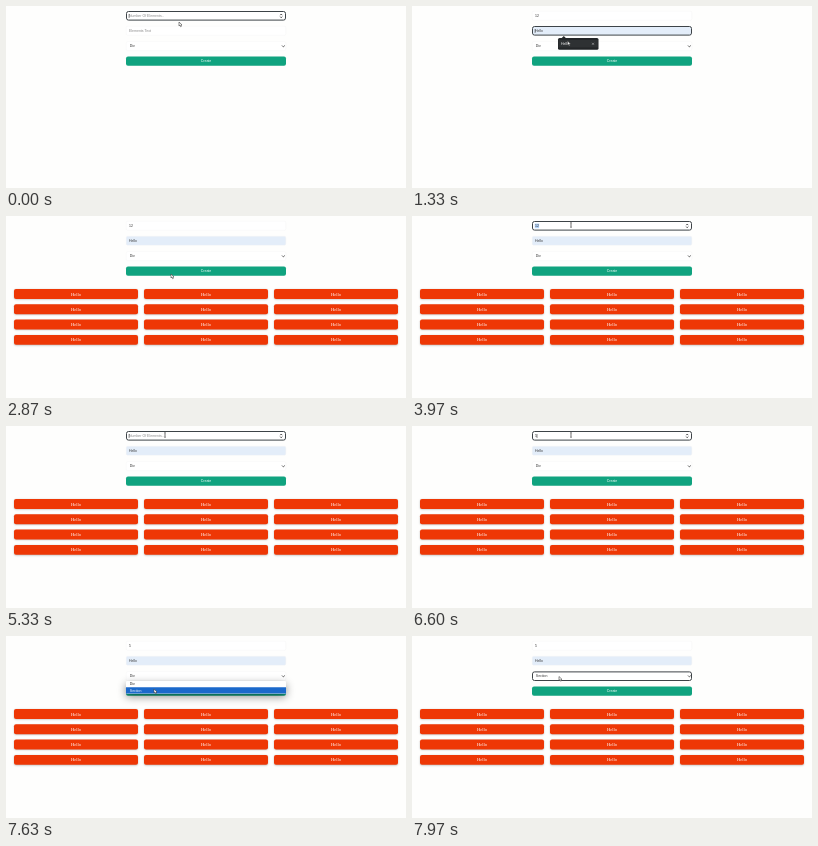
Recreate the animation shown at these times as an HTML page with a canvas. Size 400 px wide and 182 px high, loop 8000 ms.

```html
<!DOCTYPE html>
<html lang="en">
<meta charset="utf-8">
<title>Element generator</title>
<style>
  html, body { margin: 0; width: 100%; height: 100%; overflow: hidden; background: #fefefd; }
  canvas { display: block; }
</style>
<canvas id="stage" width="400" height="182"></canvas>
<script>
const LOOP = 8000;
const c = document.getElementById('stage').getContext('2d');
const SANS = '3.5px "Liberation Sans", Arial, sans-serif';
const SERIF = '4.6px "Liberation Serif", Times, serif';
const DARK = '#3d4347', INK = '#333', GREEN = '#10a37f', RED = '#ee3705', BLUE = '#e3edf9';

// Pointer path: time, x, y
const path = [
  [0, 173, 16], [1000, 173, 16], [1180, 160, 25], [1330, 155.5, 35], [1800, 155, 38],
  [2270, 154, 40], [2600, 165, 58], [3500, 165, 58], [3900, 159, 9], [4200, 159, 9],
  [6600, 159, 9], [7050, 147.5, 41.5], [7300, 147.5, 41.5], [7500, 148, 53],
  [7680, 148, 53], [7930, 147, 40.5], [LOOP, 147, 40.5]
];

const within = (t, a, b) => t >= a && t < b;
const clamp = v => Math.max(0, Math.min(1, v));

function pointerAt(t) {
  const i = path.findIndex(p => p[0] > t);
  const [t0, x0, y0] = path[i - 1], [t1, x1, y1] = path[i];
  const u = (t - t0) / (t1 - t0), k = u * u * (3 - 2 * u);
  return [x0 + (x1 - x0) * k, y0 + (y1 - y0) * k];
}

function box(x, y, w, h, r, fill, stroke, line = 1) {
  c.beginPath();
  c.roundRect(x, y, w, h, r);
  if (fill) { c.fillStyle = fill; c.fill(); }
  if (stroke) { c.strokeStyle = stroke; c.lineWidth = line; c.stroke(); }
}

function text(s, x, y, color = INK, font = SANS, align = 'left') {
  c.font = font;
  c.fillStyle = color;
  c.textAlign = align;
  c.fillText(s, x, y);
}

function lines(points, color, width) {
  c.beginPath();
  points.forEach(([x, y], i) => i ? c.lineTo(x, y) : c.moveTo(x, y));
  c.strokeStyle = color;
  c.lineWidth = width;
  c.stroke();
}

function shadow(color, blur, y) {
  c.shadowColor = color;
  c.shadowBlur = blur;
  c.shadowOffsetY = y;
}

function field(y, focused, fill = '#fff') {
  if (focused) box(120.5, y + .5, 159, 8.6, 2, fill, DARK);
  else box(120.2, y + .2, 159.6, 9.1, 1.5, fill, '#f3f3f2', .4);
}

function caret(s, y) {
  c.font = SANS;
  const x = 123 + c.measureText(s).width + .1;
  lines([[x, y - 2], [x, y + 2]], '#222', .5);
}

function form(t) {
  const first = t < 1150 || within(t, 3900, 7050);
  const second = within(t, 1150, 2700);
  const count = t < 100 ? '' : t < 230 ? '1' : t < 4130 ? '12' : t < 6480 ? '' : '5';

  field(5, first);
  if (within(t, 3900, 4130)) box(122.8, 7.6, 4.3, 4.6, 0, '#b5d5fb');
  text(count || 'Number Of Elements..', 123, 11.2, count ? INK : '#858585');
  if (first) {
    lines([[274.2, 9.2], [275.2, 8], [276.2, 9.2]], INK, .8);
    lines([[274.2, 10.6], [275.2, 11.8], [276.2, 10.6]], INK, .8);
    const blinkOff = within(t, 800, 1150) || within(t, 4730, 5000) || within(t, 5800, 6000);
    if (!blinkOff && !within(t, 3900, 4130)) caret(count, 10);
  }

  const filled = t >= 1300;
  field(20, second, filled ? BLUE : '#fff');
  text(filled ? 'Hello' : 'Elements Text', 123, 26.2, filled ? INK : '#858585');
  if (second) caret(t < 1800 ? '' : 'Hello', 25);

  field(35.4, t >= 7680);
  text(t < 7680 ? 'Div' : 'Section', 123.8, 41.3);
  lines([[276, 39.5], [277.4, 40.9], [278.8, 39.5]], INK, .8);

  box(120, 50.4, 160, 9.3, 2, GREEN);
  text('Create', 200, 56.3, '#fff', SANS, 'center');
}

function grid() {
  for (let i = 0; i < 12; i++) {
    const x = 8 + i % 3 * 130, y = 73 + Math.floor(i / 3) * 15.3;
    shadow('rgba(0,0,0,.25)', 2, .6);
    box(x, y, 124, 9.9, 2, RED);
    shadow('transparent', 0, 0);
    text('Hello', x + 62, y + 6.5, '#fff', SERIF, 'center');
  }
}

function suggestion(t) {
  c.globalAlpha = clamp((t - 1180) / 80) * clamp((2305 - t) / 135);
  c.fillStyle = '#222527';
  c.beginPath();
  c.moveTo(149.5, 32.3);
  c.lineTo(151.8, 30);
  c.lineTo(154.1, 32.3);
  c.fill();
  box(146, 32, 40.5, 11.8, 1.5, '#222527');
  if (t >= 1300) box(146.6, 34, 39.3, 7.6, 0, '#2e3133');
  text('Hello', 149, 39.2, '#fff');
  lines([[180, 36.8], [182, 38.8]], '#ccc', .5);
  lines([[182, 36.8], [180, 38.8]], '#ccc', .5);
  c.globalAlpha = 1;
}

function dropdown(t) {
  const hover = t < 7400 ? 0 : 1;
  shadow('rgba(0,0,0,.45)', 9, 3);
  box(120, 45, 160, 12.8, 1, '#fff');
  shadow('transparent', 0, 0);
  box(120, 45 + hover * 6.3, 160, 6.3, 0, '#1b69cb');
  ['Div', 'Section'].forEach((s, i) =>
    text(s, 123.8, 49.3 + i * 6.2, i === hover ? '#fff' : '#222'));
}

function pointer(t) {
  if (within(t, 100, 1000)) return;
  const [x, y] = pointerAt(t);
  if (within(t, 3850, 6700)) {
    lines([[x, y - 2.2], [x, y + 2.2]], '#333', .7);
    lines([[x - .9, y - 2.3], [x + .9, y - 2.3]], '#333', .5);
    lines([[x - .9, y + 2.3], [x + .9, y + 2.3]], '#333', .5);
    return;
  }
  c.beginPath();
  [[0, 0], [0, 4], [.9, 3.2], [1.6, 4.7], [2.4, 4.3], [1.8, 3], [3, 2.9]]
    .forEach(([dx, dy]) => c.lineTo(x + dx, y + dy));
  c.closePath();
  c.fillStyle = '#fff';
  c.fill();
  c.strokeStyle = '#444';
  c.lineWidth = .6;
  c.stroke();
}

function draw(now) {
  const t = now % LOOP;
  c.fillStyle = '#fefefd';
  c.fillRect(0, 0, 400, 182);
  form(t);
  if (t >= 2730) grid();
  if (within(t, 1180, 2305)) suggestion(t);
  if (within(t, 7060, 7680)) dropdown(t);
  pointer(t);
}

const start = performance.now();
(function loop() {
  draw(performance.now() - start);
  requestAnimationFrame(loop);
})();
</script>
</html>
```
